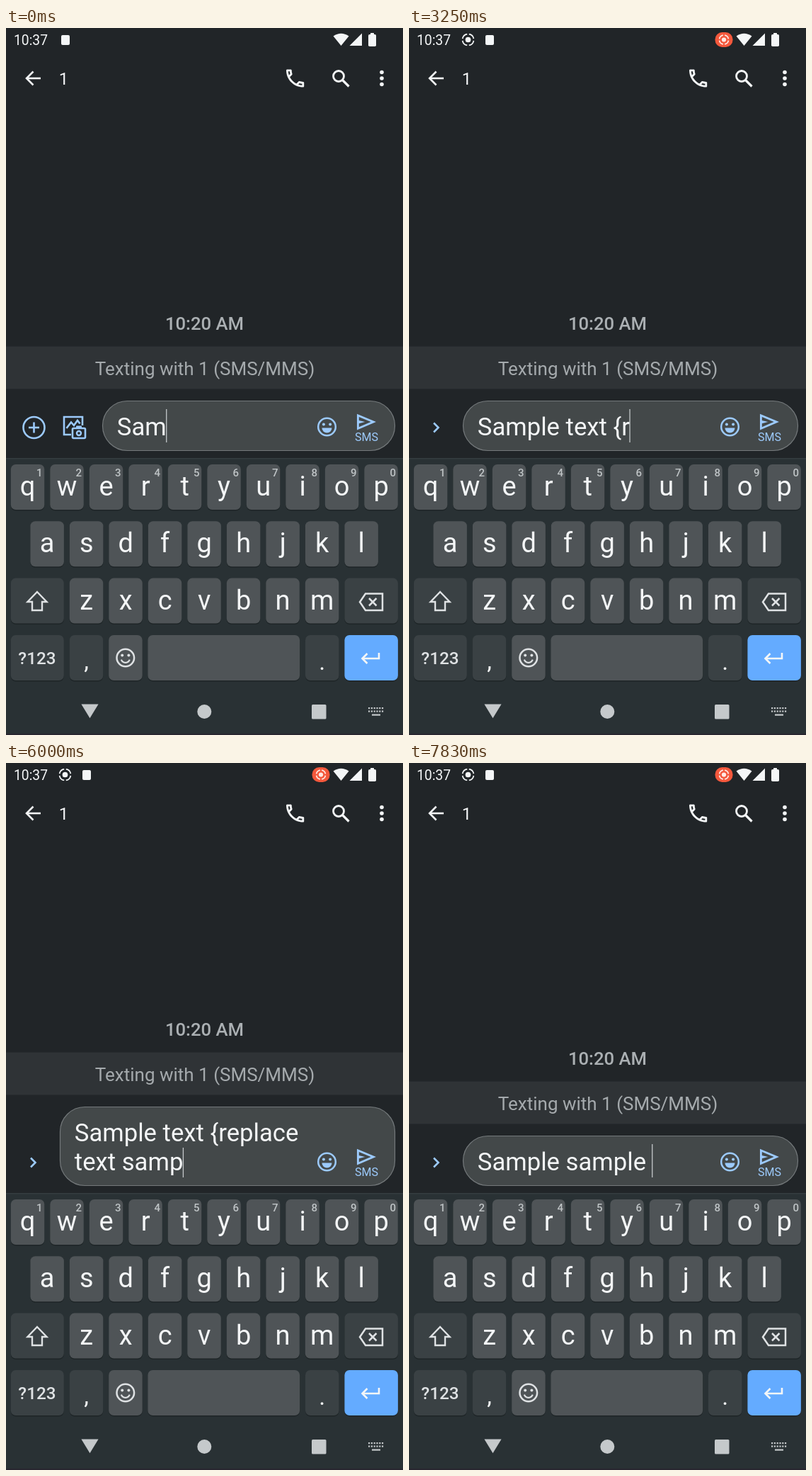
An HTML page with a canvas for the animation above (8000 ms loop, 561x998 px).

```html
<!DOCTYPE html>
<html lang="en">
<head>
<meta charset="utf-8">
<title>Typing a message</title>
<style>
html, body { margin: 0; width: 100%; height: 100%; overflow: hidden; background: #212528; }
canvas { display: block; width: 561px; height: 998px; }
</style>
</head>
<body>
<canvas id="stage"></canvas>
<script>
const W = 561, H = 998, LOOP = 8000, LINE = 41;
const WHITE = '#f4f6f7', SOFT = '#dfe2e4', BLUE = '#9ccafc', NAV = '#c5c9cb';
const BG = '#212528', BOARD = '#293134', KEY = '#4f5457', DARK_KEY = '#3a4144';

const canvas = document.getElementById('stage');
const ctx = canvas.getContext('2d');
const dpr = window.devicePixelRatio || 1;
canvas.width = W * dpr;
canvas.height = H * dpr;

// Message content from each time on
const typed = [
  [0, 'Sam'], [170, 'Samp'], [330, 'Sampl'], [500, 'Sample'], [670, 'Sample '],
  [1500, 'Sample t'], [1580, 'Sample te'], [1750, 'Sample tex'], [1830, 'Sample text'],
  [2250, 'Sample text '], [2830, 'Sample text {'], [3250, 'Sample text {r'],
  [3330, 'Sample text {rep'], [3500, 'Sample text {repl'], [3670, 'Sample text {repla'],
  [3830, 'Sample text {replac'], [4000, 'Sample text {replace'], [4170, 'Sample text {replace ']
];
const secondLine = [
  [4500, 'te'], [4670, 'tex'], [4830, 'text'], [5000, 'text '], [5250, 'text s'],
  [5500, 'text sa'], [5750, 'text sam'], [6000, 'text samp'], [6170, 'text sampl'],
  [6330, 'text sample'], [6670, 'text sample}'], [7670, 'text sample}$']
];
for (const [at, words] of secondLine) typed.push([at, 'Sample text {replace\n' + words]);
typed.push([7750, 'Sample sample ']);

const caretGaps = [[1250, 1500], [7170, 7670]];

const phonePath = new Path2D('M6.54 5c.06.89.21 1.76.45 2.59l-1.2 1.2c-.41-1.2-.67-2.47-.76-3.79h1.51m9.86 12.02c.85.24 1.72.39 2.6.45v1.49c-1.32-.09-2.59-.35-3.8-.75l1.2-1.19M7.5 3H4c-.55 0-1 .45-1 1 0 9.39 7.61 17 17 17 .55 0 1-.45 1-1v-3.49c0-.55-.45-1-1-1-1.24 0-2.45-.2-3.57-.57-.1-.04-.21-.05-.31-.05-.26 0-.51.1-.71.29l-2.2 2.2c-2.83-1.45-5.15-3.76-6.59-6.59l2.2-2.2c.28-.28.36-.67.25-1.02C8.7 6.45 8.5 5.25 8.5 4c0-.55-.45-1-1-1z');
const sendPath = new Path2D('M3 20V4l19 8zm2-3l11.85-5L5 7v3.5l6 1.5-6 1.5z');

function box(x, y, w, h, r, fill, line, width = 1) {
  ctx.beginPath();
  ctx.roundRect(x, y, w, h, r);
  paint(fill, line, width);
}

function paint(fill, line, width) {
  if (fill) { ctx.fillStyle = fill; ctx.fill(); }
  if (line) { ctx.strokeStyle = line; ctx.lineWidth = width; ctx.stroke(); }
}

function dot(x, y, r, fill, line, width) {
  ctx.beginPath();
  ctx.arc(x, y, r, 0, Math.PI * 2);
  paint(fill, line, width);
}

function arc(x, y, r, from, to, line, width) {
  ctx.beginPath();
  ctx.arc(x, y, r, from, to);
  paint(null, line, width);
}

// Points are given as x, y pairs
function poly(pts, closed, fill, line, width) {
  ctx.beginPath();
  for (let i = 0; i < pts.length; i += 2) ctx.lineTo(pts[i], pts[i + 1]);
  if (closed) ctx.closePath();
  paint(fill, line, width);
}

function icon(path, x, y, scale, color) {
  ctx.save();
  ctx.translate(x, y);
  ctx.scale(scale, scale);
  ctx.fillStyle = color;
  ctx.fill(path, 'evenodd');
  ctx.restore();
}

function setFont(size, weight = 400) {
  ctx.font = `${weight} ${size}px Roboto, sans-serif`;
}

function label(text, x, y, size, color, align = 'center', weight = 400) {
  setFont(size, weight);
  ctx.textAlign = align;
  ctx.fillStyle = color;
  ctx.fillText(text, x, y);
}

function recordMark(x, y, r, color) {
  dot(x, y, r * 0.48, color);
  for (let i = 0; i < 4; i++) {
    const mid = Math.PI / 4 + i * Math.PI / 2;
    arc(x, y, r, mid - 0.62, mid + 0.62, color, 1.7);
  }
}

function drawStatus(recording) {
  label('10:37', 11, 24, 19.3, WHITE, 'left');
  if (recording) {
    recordMark(83.5, 16.5, 8, WHITE);
    box(432.5, 6, 25, 21, 10, '#f4583c');
    recordMark(445, 16.5, 6.5, '#ffe9e4');
  }
  box((recording ? 114 : 84) - 6, 10, 12, 14, 2, WHITE);
  ctx.beginPath();
  ctx.moveTo(473.5, 25);
  ctx.lineTo(462.5, 11.5);
  ctx.quadraticCurveTo(473.5, 4, 484.5, 11.5);
  ctx.closePath();
  paint(WHITE);
  poly([503, 7.5, 503, 25, 485.5, 25], true, WHITE);
  box(512, 9, 11, 17, 1.8, WHITE);
  box(515, 7, 5, 3, 0.5, WHITE);
}

function drawToolbar() {
  poly([49, 71, 29, 71], false, null, WHITE, 2.6);
  poly([38.5, 61.5, 29, 71, 38.5, 80.5], false, null, WHITE, 2.6);
  label('1', 81.5, 80, 24, WHITE);
  icon(phonePath, 391.8, 54.2, 1.4, WHITE);
  dot(470, 68, 7.5, null, WHITE, 2.8);
  poly([475.5, 73.5, 484.5, 82.5], false, null, WHITE, 3.2);
  for (const y of [62.5, 71, 79.5]) dot(531, y, 2.8, WHITE);
}

function drawAttachIcons() {
  dot(39.5, 564, 15, null, BLUE, 2.6);
  poly([32, 564, 47, 564], false, null, BLUE, 2.6);
  poly([39.5, 556.5, 39.5, 571.5], false, null, BLUE, 2.6);

  poly([92, 574, 82, 574, 82, 549, 108, 549, 108, 561], false, null, BLUE, 2.6);
  poly([85.5, 565, 92, 556.5, 96, 561, 101, 554, 104.5, 558.5], false, null, BLUE, 2.6);
  box(94, 565, 18, 14, 1.5, BG, BLUE, 2.6);
  box(99, 561.5, 8, 4, 1, BLUE);
  dot(103, 572, 3, null, BLUE, 2.4);
}

function drawSmile(x, y, color, open) {
  dot(x, y, 12.3, null, color, 2.5);
  dot(x - 4.6, y - 3.4, 2, color);
  dot(x + 4.6, y - 3.4, 2, color);
  if (open) {
    ctx.beginPath();
    ctx.arc(x, y + 1.5, 7, 0, Math.PI);
    ctx.closePath();
    paint(color);
  } else {
    arc(x, y + 0.5, 6.4, 0.35, Math.PI - 0.35, color, 2.2);
  }
}

function drawComposer(t) {
  const message = typed.findLast(([at]) => at <= t)[1];
  const lines = message.split('\n');
  const lift = (lines.length - 1) * LINE;
  const p = Math.min(1, Math.max(0, (t - 2790) / 360));
  const wide = p * p * (3 - 2 * p);
  const left = 136.5 - 60 * wide;
  const textX = left + 20.3;

  label('10:20 AM', 280.5, 425.5 - lift, 25.7, '#abb0b3', 'center', 500);
  ctx.fillStyle = '#2f3336';
  ctx.fillRect(0, 449.5 - lift, W, 60);
  label('Texting with 1 (SMS/MMS)', 281, 490 - lift, 26, '#a5aaad');

  ctx.globalAlpha = 1 - wide;
  if (wide < 1) drawAttachIcons();
  ctx.globalAlpha = wide;
  poly([35, 557.5, 41.5, 564, 35, 570.5], false, null, BLUE, 2.6);
  ctx.globalAlpha = 1;

  box(left, 526.5 - lift, 549.5 - left, 70 + lift, 35, '#434849', '#74797b', 1.2);
  lines.forEach((line, i) => {
    label(line, textX, 575 - lift + i * LINE, 34.7, WHITE, 'left');
  });

  const caretX = Math.min(418, textX + ctx.measureText(lines.at(-1)).width);
  if (!caretGaps.some(([from, to]) => t >= from && t < to)) {
    const top = lift ? 543 : 538;
    ctx.fillStyle = '#c4c8ca';
    ctx.fillRect(caretX - 0.6, top, 1.3, 585 - top);
  }
  if (message.endsWith('$')) {
    poly([caretX, 574.5, caretX + 10.5, 584.5, caretX - 10.5, 584.5], true, '#434849', '#a5a9ab', 1);
  }

  drawSmile(453.5, 563, BLUE, true);
  icon(sendPath, 491.7, 539, 1.42, BLUE);
  label('SMS', 509.5, 583, 16, BLUE);
}

function key(x, y, w = 47.5, fill = KEY) {
  box(x, y + 1.5, w, 64, 7, '#1e2527');
  box(x, y, w, 64, 7, fill);
}

function drawKeys(caps) {
  const rows = [['qwertyuiop', 6.8, 616], ['asdfghjkl', 34.4, 696.3], ['zxcvbnm', 89.8, 776.6]];
  for (const [letters, start, y] of rows) {
    [...letters].forEach((letter, i) => {
      const x = start + i * 55.5;
      key(x, y);
      label(caps ? letter.toUpperCase() : letter, x + 23.8, y + (caps ? 47 : 44), 38, WHITE);
      if (y === 616) label((i + 1) % 10, x + 40.5, 632.5, 15, '#bfc4c6', 'center', 500);
    });
  }

  key(6.8, 776.6, 75, DARK_KEY);
  poly([44, 796, 57.5, 810, 51, 810, 51, 822, 37, 822, 37, 810, 30.5, 810], true, caps ? WHITE : null, SOFT, 2.4);
  key(478.4, 776.6, 75.5, DARK_KEY);
  poly([508, 798.5, 532, 798.5, 532, 822, 508, 822, 500, 810.2], true, null, SOFT, 2.5);
  poly([513, 805, 523.5, 815.5], false, null, SOFT, 2.5);
  poly([523.5, 805, 513, 815.5], false, null, SOFT, 2.5);

  const y = 857;
  key(6.8, y, 75, DARK_KEY);
  label('?123', 44, 898, 24.3, SOFT, 'center', 500);
  key(89.8, y, 47.5, DARK_KEY);
  label(',', 113.5, 905, 34, WHITE);
  key(145.2, y);
  drawSmile(168.8, 889, SOFT, false);
  key(200.4, y, 214.7);
  key(423, y, 47.5, DARK_KEY);
  label('.', 446.7, 906, 34, WHITE);
  key(478.4, y, 75.5, '#64abff');
  poly([527, 882, 527, 890, 504, 890], false, null, WHITE, 2.6);
  poly([510.5, 883, 503.5, 890, 510.5, 897], false, null, WHITE, 2.6);
}

function drawNav() {
  poly([107.5, 955, 129.5, 955, 118.5, 973], true, NAV, NAV, 1.2);
  dot(280.3, 965, 10, NAV);
  box(432, 955, 20.5, 20.5, 1.5, NAV);
  ctx.fillStyle = NAV;
  for (let i = 0; i < 6; i++) {
    ctx.fillRect(512 + i * 3.8, 959, 2.2, 2.2);
    ctx.fillRect(512 + i * 3.8, 963.5, 2.2, 2.2);
  }
  ctx.fillRect(517, 968.5, 12, 2.2);
  ctx.fillStyle = '#28262f';
  ctx.fillRect(0, 996, W, 2);
}

function draw(t) {
  ctx.setTransform(dpr, 0, 0, dpr, 0, 0);
  ctx.fillStyle = BG;
  ctx.fillRect(0, 0, W, H);
  drawStatus(t >= 80);
  drawToolbar();
  drawComposer(t);
  ctx.fillStyle = BOARD;
  ctx.fillRect(0, 608, W, H - 608);
  ctx.fillStyle = '#353d40';
  ctx.fillRect(0, 607, W, 1.5);
  drawKeys(t >= 7670 && t < 7750);
  drawNav();
}

const start = performance.now();
function tick() {
  draw((performance.now() - start) % LOOP);
  requestAnimationFrame(tick);
}
tick();
</script>
</body>
</html>
```
